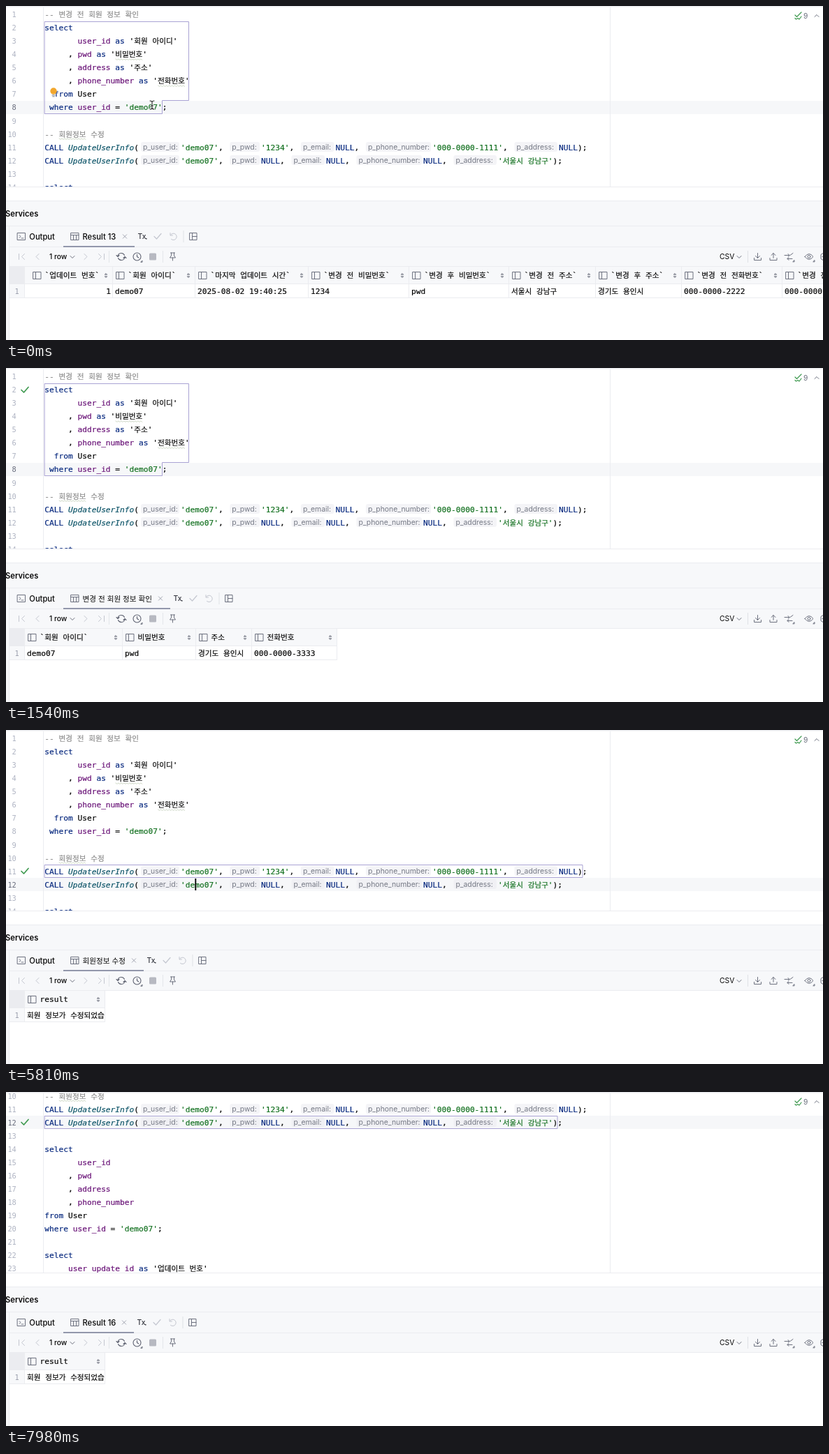
An HTML page with a canvas that plays this animation: 1169 px wide and 479 px high, repeating every 8 s.

```html
<!DOCTYPE html>
<html lang="ko">
<head>
<meta charset="utf-8">
<title>SQL console</title>
<style>
html, body { margin: 0; width: 100%; height: 100%; overflow: hidden; background: #fff; }
canvas { display: block; width: 1169px; height: 479px; }
</style>
</head>
<body>
<canvas id="stage"></canvas>
<script>
const W = 1169, H = 479, LOOP = 8000, TICK = 70;
const LINE = 19.05, TOP = 2.5, BASE = 13.6, LEFT = 55.3, CELL = 6.74;
const MONO = '"DejaVu Sans Mono", monospace';
const UI = 'Inter, sans-serif';
const KR = '"Noto Sans CJK KR", "Noto Sans CJK", sans-serif';
const INK = '#080808', ICON = '#6c707e', FAINT = '#c4c7d0', RULE = '#ebecf0', PANEL = '#f7f8fa';
const SELECTION = '#cacaff', GREEN = '#3f9a50';
const USER = 'demo07';

const canvas = document.getElementById('stage');
const ctx = canvas.getContext('2d');
const dpr = window.devicePixelRatio || 1;
canvas.width = W * dpr;
canvas.height = H * dpr;

const CODE = [
  '-- 변경 전 회원 정보 확인',
  'select',
  "       user_id as '회원 아이디'",
  "     , pwd as '비밀번호'",
  "     , address as '주소'",
  "     , phone_number as '전화번호'",
  '  from User',
  ` where user_id = '${USER}';`,
  '',
  '-- 회원정보 수정',
  `CALL UpdateUserInfo({p_user_id:250}'${USER}', {p_pwd:365}'1234', {p_email:471.5}NULL, {p_phone_number:610}'000-0000-1111', {p_address:791}NULL);`,
  `CALL UpdateUserInfo({p_user_id:250}'${USER}', {p_pwd:365}NULL, {p_email:458}NULL, {p_phone_number:597}NULL, {p_address:704}'서울시 강남구');`,
  '',
  'select',
  '       user_id',
  '     , pwd',
  '     , address',
  '     , phone_number',
  'from User',
  `where user_id = '${USER}';`,
  '',
  'select',
  "     user_update_id as '업데이트 번호'"
];
// Line number -> column of a four-syllable typo underline
const TYPOS = { 4: 15, 6: 24, 10: 3 };
const TOKEN = /(--.*)|(\{\w+:[\d.]+\})|(?<=as )('.*?')|('.*?')|\b(select|from|where|as|CALL|NULL)\b|\b(user_\w+|pwd|address|phone_number)\b|(UpdateUserInfo)|\s+|\w+|./g;
const COLORS = [INK, '#8c8c8c', '', INK, '#12701f', '#08297f', '#6a1478', '#0d5468'];
const HINT = 2, ROUTINE = 7;
const STATEMENT_END = { 8: 224, 11: 825, 12: 789 };

const TABLES = {
  history: {
    edges: [27, 153, 271, 433, 577, 720, 844, 967, 1111, 1230],
    heads: ['`업데이트 번호`', '`회원 아이디`', '`마지막 업데이트 시간`', '`변경 전 비밀번호`', '`변경 후 비밀번호`',
      '`변경 전 주소`', '`변경 후 주소`', '`변경 전 전화번호`', '`변경 전 이메일`'],
    cells: ['1', USER, '2025-08-02 19:40:25', '1234', 'pwd', '서울시 강남구', '경기도 용인시', '000-0000-2222', '000-0000-3333'],
    numeric: true
  },
  member: {
    edges: [27, 167, 272, 352, 474],
    heads: ['`회원 아이디`', '비밀번호', '주소', '전화번호'],
    cells: [USER, 'pwd', '경기도 용인시', '000-0000-3333']
  },
  result: { edges: [27, 142], heads: ['result'], cells: ['회원 정보가 수정되었습니다.'] }
};

const at = (t, keys) => keys.reduce((v, [time, value]) => (t >= time ? value : v), 0);
const baseline = n => TOP + (n - 1) * LINE + BASE;
const lineTop = n => Math.round(TOP + (n - 1) * LINE);

function rect(x, y, w, h, color) {
  ctx.fillStyle = color;
  ctx.fillRect(x, y, w, h);
}

function round(x, y, w, h, r, color) {
  ctx.beginPath();
  ctx.roundRect(x, y, w, h, r);
  ctx.fillStyle = color;
  ctx.fill();
}

// Draws Hangul and other runs in their own fonts and returns the end x
function text(s, x, y, { family = UI, color = INK, size = 11.2, style = '', heavy = 0 } = {}) {
  ctx.fillStyle = ctx.strokeStyle = color;
  ctx.lineWidth = heavy;
  for (const run of s.match(/[가-힣]+|[^가-힣]+/g) || []) {
    const hangul = /[가-힣]/.test(run);
    ctx.font = `${style} ${hangul ? size * 0.946 : size}px ${hangul ? KR : family}`;
    ctx.fillText(run, x, y);
    if (heavy) ctx.strokeText(run, x, y);
    x += ctx.measureText(run).width;
  }
  return x;
}

const mono = (s, x, y, color, style) => text(s, x, y, { family: MONO, color, style, heavy: 0.2 });

function icon(d, x, y, color = ICON, width = 1) {
  ctx.save();
  ctx.translate(x, y);
  ctx.strokeStyle = color;
  ctx.lineWidth = width;
  ctx.lineCap = ctx.lineJoin = 'round';
  ctx.stroke(new Path2D(d));
  ctx.restore();
}

const CHECK = 'M-5 0 L-1.5 3.5 L5 -4';
const DOWN = 'M-3 -1.5 L0 1.5 L3 -1.5';

function clipped(x, y, w, h, draw) {
  ctx.save();
  ctx.beginPath();
  ctx.rect(x, y, w, h);
  ctx.clip();
  draw();
  ctx.restore();
}

function hint(token, x, n) {
  const [name, next] = token.slice(1, -1).split(':');
  round(x + 3, lineTop(n) + 2, next - x - 5, 14, 3, 'rgba(235,236,240,.55)');
  text(name + ':', x + 6, baseline(n) - 0.6, { size: 10.4, color: '#757985' });
  return +next;
}

function codeLine(n) {
  let x = LEFT;
  for (const m of CODE[n - 1].matchAll(TOKEN)) {
    const kind = Math.max(0, m.findIndex((g, i) => i && g !== undefined));
    x = kind === HINT ? hint(m[0], x, n)
      : mono(m[0], x, baseline(n), COLORS[kind], kind === ROUTINE ? 'italic' : '');
  }
  if (TYPOS[n]) {
    let wave = 'M0 0';
    for (let i = 1; i <= 19; i++) wave += `L${i * 2} ${i % 2 ? 1.4 : 0}`;
    icon(wave, LEFT + TYPOS[n] * CELL + 0.5, lineTop(n) + 16, '#b9c7ae', 0.7);
  }
}

function lineNumber(n, current) {
  const s = String(n);
  text(s, 14.8 - s.length * 6.2, baseline(n),
    { family: MONO, size: 10.3, color: n === current ? '#686c7c' : '#aeb3c2' });
}

function statementPath(n) {
  const y = lineTop(n), end = STATEMENT_END[n];
  if (n !== 8) return `M55.5 ${y + .5}H${end}V${y + 18.5}H55.5Z`;
  return 'M55.5 22.5H261.5V135.5H223.5V154.5H55.5Z';
}

function selection(n) {
  if (n === 8) rect(55, 22, W - 55, 114, SELECTION);
  rect(55, lineTop(n), STATEMENT_END[n] - 55, 19, SELECTION);
}

function bulb() {
  ctx.beginPath();
  ctx.arc(68, 122, 4.7, 0, 7);
  ctx.fillStyle = '#f2a72e';
  ctx.fill();
  icon('M-2 0H2M-1.3 2H1.3', 68, 127.8, '#7d808a');
}

function editor(s) {
  clipped(0, 2, W, 257, () => {
    ctx.translate(0, -s.scroll);
    rect(0, lineTop(s.current), W, 19, '#f6f7f9');
    rect(53, 0, 1, 500, RULE);
    rect(864, 0, 1, 500, RULE);
    if (s.selected) selection(s.boxed);
    icon(statementPath(s.boxed), 0, 0, '#aaa3d4');
    CODE.forEach((_, i) => {
      lineNumber(i + 1, s.current);
      codeLine(i + 1);
    });
    if (s.bulb) bulb();
    if (s.check) icon(CHECK, 27, lineTop(s.check) + 9.5, GREEN, 1.7);
    if (s.caret) rect(s.current === 8 ? 210 : 270.4, lineTop(s.current) + 1, 1.8, 17, '#000');
  });
  rect(0, 0, W, 1.5, RULE);
  rect(0, 259, W, 1, RULE);
  round(1121, 4, 60, 19, 5, '#fff');
  icon('M-4 -1L-1.5 1.5L5 -5M-4 3.5L-2.5 5L0 3.5L2 5L5 1', 1133, 14, GREEN, 1.2);
  text('9', 1141, 18, { size: 10.3, color: ICON });
  icon('M-3 1.5L0 -1.5L3 1.5', 1160, 14);
}

function tabs(label, close) {
  icon('M-5.5 -5H5.5V5H-5.5ZM-3 -2L-1 0L-3 2M0 2.5H3', 22, 330.5);
  text('Output', 33.3, 334.5, { style: '500' });
  icon('M-5.5 -5H5.5V5H-5.5ZM-5.5 -2H5.5M-2 -2V5M2 -2V5', 98.5, 330.5);
  text(label, 109.5, 334.5, { style: '500' });
  icon('M-2.7 -2.7L2.7 2.7M2.7 -2.7L-2.7 2.7', close, 330.5, '#9a9dab', 0.9);
  rect(82, 344, close - 68, 2, '#9297ab');
  text('Tx', close + 18.5, 334, { size: 10.3, style: '500', color: '#34363f' });
  rect(close + 30, 333, 1.5, 1.5, '#34363f');
  icon(CHECK, close + 47, 330.5, FAINT, 1.2);
  icon('M-4.5 -5V-1.5H-1M-4.2 -1.8A4.7 4.7 0 1 1 -3 4', close + 69.5, 330.5, FAINT);
  rect(close + 83.5, 322, 1, 17, '#dfe1e5');
  icon('M-5 -5H5V5H-5ZM-1.5 -5V5M-1.5 0H5', close + 98, 330.5);
}

function toolbar() {
  icon('M-4 -4V4M4 -4L0 0L4 4', 22.5, 359.5, FAINT);
  icon('M2 -4L-2 0L2 4', 45, 359.5, FAINT);
  text('1 row', 62, 363.3, { size: 10.3, style: '500' });
  icon(DOWN, 95, 360);
  icon('M-2 -4L2 0L-2 4', 114, 359.5, FAINT);
  icon('M4 -4V4M-4 -4L0 0L-4 4', 136.5, 359.5, FAINT);
  rect(147, 351, 1, 17, '#e4e6ea');
  icon('M-5 -1A5 5 0 0 1 4.5 -2M5 1A5 5 0 0 1 -4.5 2M-7 -2L-5 0L-3 -2M7 2L5 0L3 2', 165, 359.5, '#5d6170', 1.1);
  icon('M5.5 0A5.5 5.5 0 1 1 -5.5 0A5.5 5.5 0 1 1 5.5 0M0 -3V0L2.3 1.5', 187.5, 359.5, '#5d6170', 1.1);
  icon('M0 2L2 0V2Z', 193, 365);
  round(205, 354.5, 10, 10, 1.5, '#b7b9c1');
  rect(224, 351, 1, 17, '#e4e6ea');
  icon('M-3 -5H3M-2 -5V-1L-4 2H4L2 -1V-5M0 2V6', 238.5, 359);
  text('CSV', 1021, 363.3, { size: 10.3 });
  icon(DOWN, 1049, 360);
  rect(1061, 351, 1, 17, '#dfe1e5');
  icon('M0 -5V2M-3 -1L0 2L3 -1M-5 2V5H5V2', 1075.5, 359.5);
  icon('M0 2V-5M-3 -2L0 -5L3 -2M-5 2V5H5V2', 1098, 359.5);
  icon('M-6 -2H1M-1 -4L1 -2L-1 0M6 -5L2 -2M5 3H-2M0 1L-2 3L0 5M6 7L8 5V7Z', 1120, 359.5);
  icon('M-6 0Q0 -8 6 0Q0 8 -6 0ZM2 0A2 2 0 1 1 -2 0A2 2 0 1 1 2 0M6 7L8 5V7Z', 1149, 359.5);
  icon('M5 -3L0 -5L-3 -3V3L0 5L5 3M-1 0H2', 1169, 359.5);
}

function grid({ edges, heads, cells, numeric }) {
  const end = Math.min(W, edges[edges.length - 1]);
  rect(5, 374, end - 5, 25, PANEL);
  rect(5, 374, 22, 25, RULE);
  rect(5, 399, 22, 20, PANEL);
  for (const y of [373, 398, 418]) rect(5, y, end - 5, 1, RULE);
  for (const x of edges) rect(x - 1, 374, 1, 45, RULE);
  text('1', 12.5, 413, { family: MONO, size: 10.3, color: '#9a9eac' });
  heads.forEach((head, i) => {
    const x = edges[i], right = edges[i + 1];
    const shift = numeric && !i ? 7 : 0;
    clipped(x, 374, right - x - 1, 45, () => {
      icon('M-5.5 -5H5.5V5H-5.5ZM-2 -5V5', x + 10.5 + shift, 386.5);
      mono(head, x + 21.5 + shift, 390);
      icon('M-1.4 -1.6L0 -3L1.4 -1.6ZM-1.4 1.6L0 3L1.4 1.6Z', right - 10, 386.5, '#5d6170', 0.9);
      mono(cells[i], shift ? right - 3 - CELL : x + 3, 413);
    });
  });
}

function services(s) {
  rect(0, 279, W, 95, PANEL);
  rect(0, 279, W, 1, RULE);
  text('Services', -1, 301.5, { style: '600' });
  rect(0, 315, W, 1, RULE);
  rect(0, 316, 5, H - 316, PANEL);
  rect(4, 316, 1, H - 316, RULE);
  rect(5, 345, W, 1, RULE);
  tabs(...s.tab);
  toolbar();
  rect(5, 373, W, 1, RULE);
  grid(TABLES[s.table]);
}

function popup(current) {
  const x = current === 8 ? 210 : 270, y = lineTop(current) + 18, w = 313, h = 100;
  ctx.save();
  ctx.shadowColor = 'rgba(0,0,0,.32)';
  ctx.shadowBlur = 10 * dpr;
  ctx.shadowOffsetY = 2 * dpr;
  round(x, y, w, h, 7, '#fff');
  ctx.restore();
  ctx.save();
  ctx.beginPath();
  ctx.roundRect(x, y, w, h, 7);
  ctx.clip();
  rect(x, y + 35, w, 21, '#d1dffa');
  rect(x, y + 82, w, 18, '#f4f5f7');
  text('Statements', x + 126.5, y + 22.3, { style: '600' });
  const first = {
    8: "select user_id as '회원 아이디' , pwd as '비밀번호' ...",
    11: `CALL UpdateUserInfo('${USER}', '1234', NULL, '000-0...`,
    12: `CALL UpdateUserInfo('${USER}', NULL, NULL, NULL, '서...`
  };
  text(first[current], x + 1.5, y + 49.3);
  text("-- 변경 전 회원 정보 확인 select user_id as '회원 아이디' , pwd ...", x + 1.5, y + 70);
  text('Customize', x + 3, y + 95, { color: '#2f5a9e' });
  ctx.restore();
  ctx.beginPath();
  ctx.roundRect(x + .5, y + .5, w - 1, h - 1, 7);
  ctx.strokeStyle = 'rgba(0,0,0,.14)';
  ctx.lineWidth = 1;
  ctx.stroke();
}

function pointer(t) {
  const p = Math.min(1, Math.max(0, (t - 2590 + TICK) / 630));
  const e = p * p * (3 - 2 * p);
  const shape = 'M-3 -6Q0 -6 0 -4Q0 -6 3 -6M0 -4V4M-3 6Q0 6 0 4Q0 6 3 6M-1.5 1H1.5';
  const x = 209 + 62 * e, y = 142 + 67 * e;
  icon(shape, x, y, '#fff', 2.4);
  icon(shape, x, y, '#222', 1.1);
}

function stateAt(t) {
  const step = Math.floor(t / TICK) * TICK;
  const scrolled = Math.min(1, Math.max(0, (step - 7490 + TICK) / 560));
  return {
    step,
    current: at(t, [[0, 8], [3570, 11], [5810, 12]]),
    boxed: at(t, [[0, 8], [3920, 11], [6160, 12]]),
    check: at(t, [[1470, 2], [5110, 11], [7000, 12]]),
    selected: at(t, [[840, 1], [1470, 0], [4410, 1], [5040, 0], [6440, 1], [6930, 0]]),
    popup: at(t, [[910, 1], [1400, 0], [4480, 1], [4900, 0], [6510, 1], [6860, 0]]),
    caret: at(t, [[350, 1], [840, 0], [2450, 1], [3920, 0], [5810, 1], [6160, 0]]),
    bulb: at(t, [[0, 1], [840, 0], [2310, 1], [3570, 0]]),
    pointer: at(t, [[0, 1], [840, 0], [2590, 1], [4410, 0]]),
    table: at(t, [[0, 'history'], [1540, 'member'], [5110, 'result']]),
    tab: at(t, [
      [0, ['Result 13', 170]],
      [1540, ['변경 전 회원 정보 확인', 221]],
      [5110, ['회원정보 수정', 183]],
      [7000, ['Result 16', 170]],
      [7140, ['Result 16', 169]]
    ]),
    scroll: Math.round(178 * scrolled ** 1.4)
  };
}

function render(now) {
  const s = stateAt(now % LOOP);
  ctx.setTransform(dpr, 0, 0, dpr, 0, 0);
  rect(0, 0, W, H, '#fff');
  editor(s);
  services(s);
  if (s.popup) popup(s.current);
  if (s.pointer) pointer(s.step);
}

const start = performance.now();
function frame() {
  render(performance.now() - start);
  requestAnimationFrame(frame);
}
frame();
</script>
</body>
</html>
```
